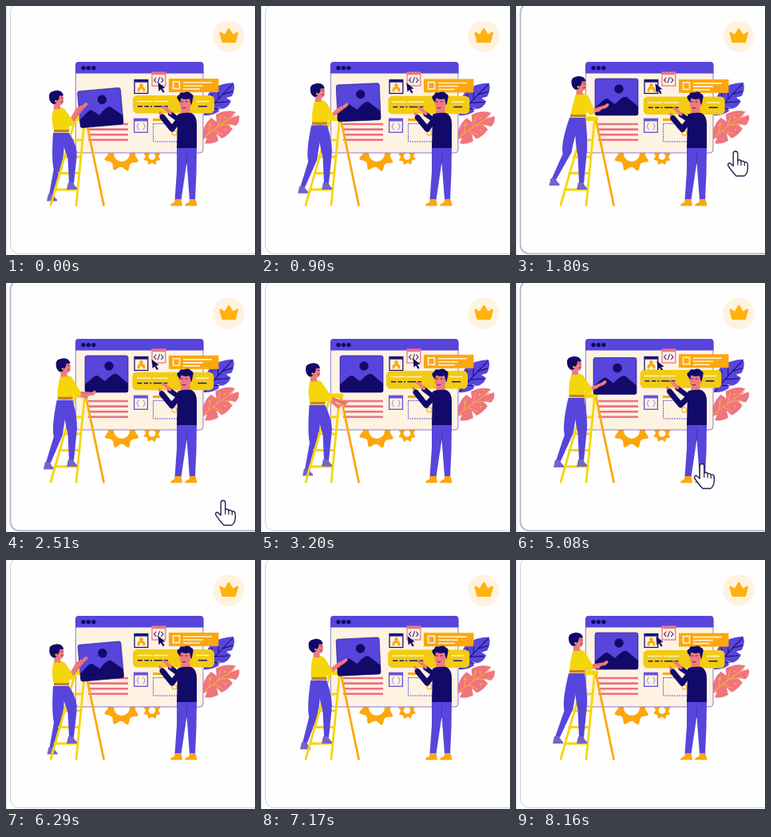
These frames come from a looping animation (312x312 px, 8.23 s). An HTML page:

```html
<!DOCTYPE html>
<html lang="en">
<head>
<meta charset="utf-8">
<title>Building a web page</title>
<style>
html, body { margin: 0; width: 100%; height: 100%; overflow: hidden; background: #fdfdfe; }
svg { display: block; width: 100vw; height: 100vh; }
.line { fill: none; stroke-linecap: round; stroke-linejoin: round; }
.purple { fill: #5745dc; } .navy { fill: #120a69; } .yellow { fill: #f4d60b; }
.orange { fill: #fca70c; } .skin { fill: #ee7b80; } .cream { fill: #fef2e2; }
</style>
</head>
<body>
<svg viewBox="0 0 312 312">
  <path d="M.7 0V312" stroke="#e2e2ea"/>
  <rect id="card" x="5.5" y="-3" width="330" height="313.4" rx="11" fill="#fefefe" stroke="#c9c8d8"/>
  <circle cx="279" cy="38" r="19.7" fill="#fff2df"/>
  <path fill="#ffb20d" d="M267.5 33.5Q267.5 32 269 32.5L274 35.5L278 28.5Q279.2 27 280.4 28.5L284.5 35.5L289.5 32.5Q291.4 32 291 34L288.3 44.5Q288 46 286.5 46H272Q270.5 46 270.2 44.5Z"/>

  <g id="leafA">
    <path class="purple" d="M248 137Q248 116 257 105Q267 97 285 96Q288 104 283 113L276 115L282 119Q279 127 271 129L265 127L267 132Q258 138 248 137Z"/>
    <path class="line" stroke="#120a69" d="M249 136Q262 120 284 98M258 126V110M266 117V104M262 121L279 120M271 111L284 107M256 128L268 129"/>
  </g>
  <g id="leafB">
    <path d="M244 168Q247 148 257 140L264 145L263 136Q276 129 288 133L280 141L292 137Q294 144 288 150L278 148L284 154Q278 163 270 166L264 160L266 169Q257 174 249 172L252 165Z" fill="#f0757e"/>
    <path class="line" stroke="#f3b13a" d="M244 168Q262 153 286 137M254 160L257 146M265 152L269 138M260 156L271 161M269 149L284 148"/>
    <g fill="#f4c63a"><circle cx="255" cy="149" r="1"/><circle cx="274" cy="140" r="1"/><circle cx="275" cy="155" r="1"/></g>
  </g>
  <g id="gears" class="orange" fill-rule="evenodd"></g>

  <rect x="87.3" y="70.5" width="159.7" height="113.5" rx="4" class="cream" stroke="#8c78d8"/>
  <path class="purple" d="M87 84.5V74Q87 70 91 70H243.5Q247.5 70 247.5 74V84.5Z"/>
  <g class="navy"><circle cx="97" cy="77.6" r="2.7"/><circle cx="103.4" cy="77.6" r="2.7"/><circle cx="109.8" cy="77.6" r="2.7"/></g>
  <path d="M103 148H153M103 154.6H153M103 161.2H153M103 167.8H153" stroke="#ed7080" stroke-width="2.6"/>

  <g id="icons"></g>
  <path class="line" stroke="#fca70c" stroke-width="3" d="M166 106Q166 102.5 169.5 102.5Q173 102.5 173 106"/>
  <circle cx="169.5" cy="99.2" r="2.2" class="orange"/>
  <path class="line" stroke="#3c237e" stroke-width="1.1" d="M188 90L185.5 92.8L188 95.6M194.5 90L197 92.8L194.5 95.6M192.4 89.4L190.2 96.2"/>
  <path class="line" stroke="#a18ad0" stroke-width="1" d="M166.5 147Q164.8 147 165 149Q165.1 150.7 163.8 150.8Q165.1 151 165 152.7Q164.8 154.6 166.5 154.6M171.8 147Q173.5 147 173.3 149Q173.2 150.7 174.5 150.8Q173.2 151 173.3 152.7Q173.5 154.6 171.8 154.6"/>
  <path d="M184 142.5H197" stroke="#fca70c" stroke-width="3"/>
  <rect x="184.5" y="147.5" width="34" height="22.5" fill="none" stroke="#6b58d8" stroke-width="1" stroke-dasharray="2 1"/>
  <circle cx="211" cy="159" r="3" fill="none" stroke="#f8bd4f" stroke-width="1.5"/>

  <g id="tag">
    <rect x="204" y="91" width="62.5" height="17" class="orange"/>
    <rect x="209.5" y="95" width="8" height="8.5" fill="none" stroke="#fef2e2" stroke-width="1.6"/>
    <path d="M222 96H258M222 100H247M222 104H243" stroke="#fef2e2" stroke-width="1.6"/>
  </g>
  <g id="arrow"><path class="navy" d="M0 0L9 7.2L5.4 7.7L8.2 12L6.2 13.2L3.5 8.8L1 11.5Z"/></g>

  <path class="line" stroke="#fca70c" stroke-width="2.8" d="M100 142L122.5 249.5"/>
  <g id="legBack"></g>
  <path class="line" stroke="#f4d60b" stroke-width="2.8" d="M79 168H96M72.500 189H94M66.500 209.500H92M61 230H90M87 141L56 249.500M98.500 142L88 249.500"/>
  <rect x="86" y="138.500" width="17" height="5.500" rx="1" class="yellow"/>

  <g id="picture">
    <rect x="-27" y="-23" width="54" height="46" rx="2.5" class="purple" stroke="#281b90" stroke-width=".7"/>
    <circle cx="3" cy="-10" r="5.700" class="navy"/>
    <path class="navy" d="M-27 13C-20 8-14-1-10 3L-2 9C4 3 10-3 14 1L27 12V20.500Q27 23 24.500 23H-24.500Q-27 23-27 20.500Z"/>
  </g>
  <g id="woman"></g>

  <g id="bar">
    <rect width="102" height="22.500" rx="5.500" fill="#f2cb12"/>
    <path class="line" stroke="#fff2bd" stroke-width="1.600" d="M6 7.500H23M26 7.500H44M80 7.500H95"/>
    <path stroke="#251879" stroke-width="1.600" d="M6 13.800H12M14.500 13.800H20M22 13.800H24M26.500 13.800H37M39 13.800H44M82 13.800H93"/>
  </g>
  <g id="man">
    <path class="purple" d="M214 176H239L238.500 210L237 243H230L226.500 196L219.500 243H211.500L214 207Z"/>
    <path class="line" stroke="#4032b8" stroke-width=".8" d="M226.500 184V197"/>
    <path class="orange" d="M211.500 242H219.500L221 250.500H206Q206 247.500 211 246ZM230 242H237.500L239.500 250.500H224Q224 247.500 229.500 246Z"/>
    <path class="skin" d="M220 125H230L231 137H219Z"/>
    <path class="navy" d="M215 136Q221 133 232 134Q239 137 239 148V178H214Z"/>
    <path class="skin" d="M217.500 115Q217 131 223 132Q231 132 232.500 120L232 113H219Z"/>
    <path class="navy" d="M216 118Q212 113 217.500 111Q217 107.500 223 108.500Q229 106 232 110Q236 111 234 117L232.500 124Q231 122 230 116Q224 118 219.500 115.500L218 121Z"/>
    <path class="line" stroke="#35145c" stroke-width=".9" d="M219.500 120H221.500M225 120H227M221 127.500Q223 129 225 127.500"/>
  </g>
  <g id="manArms"></g>

  <g id="pointer">
    <path class="line" style="fill:#fff" stroke="#25204f" stroke-width="1.400" d="M-2.800 3Q-2.800 0 0 0Q2.800 0 2.800 3V12Q4.500 9.500 7 12V13Q9.500 10.800 11.300 14Q15 12.500 15.300 17V22Q15 28 11 31H1Q-3 27-5 24L-9 18.500Q-10.500 15-7 14.800L-2.800 18.500Z"/>
    <path class="line" stroke="#25204f" stroke-width="1.200" d="M2.800 12V17M7 13V17.500M11.300 14V18"/>
  </g>
</svg>
<script>
const LOOP = 8230;
const el = id => document.getElementById(id);

const poses = [
  {t: 0, head: [63, 115], hip: [69, 157], foot: [57, 240.5], elbow: [80, 146], hand: [98, 125], pic: [118.3, 127.5, -5], bar: [159, 112], arrow: [190.5, 95.5]},
  {t: 1800, head: [78.5, 97], hip: [77, 138], foot: [47.5, 221], elbow: [94, 132], hand: [112, 126], pic: [126, 114, 0], bar: [159.7, 113.5], arrow: [174.5, 97]},
  {t: 3200, head: [65, 109.5], hip: [70.5, 151], foot: [58, 237.5], elbow: [85, 145], hand: [105, 151], pic: [126, 114, 0], bar: [157, 110], arrow: [190.5, 94.5]},
  {t: 4100, head: [73, 98], hip: [76, 139], foot: [63, 223], elbow: [92, 123], hand: [106, 107], pic: [128, 112.5, 0], bar: [159, 112.5], arrow: [188.5, 91]},
  {t: 5080, head: [73, 101], hip: [75.5, 142], foot: [53, 227], elbow: [91, 134], hand: [109, 126], pic: [124, 116.5, 0], bar: [155.5, 109], arrow: [176.5, 97.5]},
  {t: 6290, head: [63.3, 114.5], hip: [69, 156], foot: [57.5, 239.5], elbow: [80, 146], hand: [98, 125], pic: [118.8, 127, -5], bar: [159, 112], arrow: [190.5, 95]},
  {t: 8160, head: [75, 100], hip: [76, 140], foot: [52, 226], elbow: [92, 134], hand: [111, 130], pic: [126, 114, 0], bar: [159.5, 113], arrow: [175.5, 95.5]}
];
const pointerPath = [
  {t: 1100, p: [279, 314]}, {t: 1700, p: [275, 182]}, {t: 1900, p: [275, 182]}, {t: 2500, p: [272, 272]}, {t: 2680, p: [272, 314]},
  {t: 3460, p: [276, 314]}, {t: 4000, p: [262, 164.5]}, {t: 4300, p: [262, 164.5]}, {t: 4900, p: [233, 226.5]}, {t: 5180, p: [233, 226.5]}, {t: 5780, p: [236, 314]}
];

const clamp = v => Math.min(1, Math.max(0, v));
const ease = k => k * k * (3 - 2 * k);
const mix = (a, b, k) => a.map((v, i) => v + (b[i] - v) * k);
const add = (p, x, y) => [p[0] + x, p[1] + y];
const move = (id, x, y, a = 0) => el(id).setAttribute('transform', `translate(${x} ${y}) rotate(${a})`);

function sample(keys, name, t) {
  const n = Math.max(1, keys.findIndex(k => k.t > t));
  const i = keys[keys.length - 1].t <= t ? keys.length - 1 : n;
  const a = keys[i - 1], b = keys[i];
  return mix(a[name], b[name], ease(clamp((t - a.t) / (b.t - a.t))));
}

const line = (points, color, width) =>
  `<polyline class="line" points="${points.map(p => p.join()).join(' ')}" stroke="${color}" stroke-width="${width}"/>`;
const leg = (hip, knee, foot) =>
  `<path class="purple" d="M${add(hip, -7, 0)}Q${add(knee, -8, -8)} ${add(knee, -5, 4)}L${add(foot, -3, -4)}L${add(foot, 3, -4)}L${add(knee, 6, 2)}Q${add(knee, 8, -12)} ${add(hip, 7, 0)}Z"/>`;
const shoe = p =>
  `<path d="M${add(p, -4, -5)}L${add(p, 2, -5)}Q${add(p, 4, 0)} ${add(p, 7, 2)}V${p[1] + 4}H${p[0] - 6}Z" fill="#7563c8"/>`;

function gear(cx, cy, r, hole, teeth, turn) {
  const pts = [];
  for (let i = 0; i < teeth * 4; i++) {
    const a = (i + (i % 4 === 1 ? .25 : i % 4 === 2 ? -.25 : 0)) * Math.PI / teeth / 2 + turn;
    const d = i % 4 === 1 || i % 4 === 2 ? r : r * .76;
    pts.push([cx + d * Math.cos(a), cy + d * Math.sin(a)]);
  }
  return `<path d="M${pts.join('L')}Z M${cx - hole} ${cy}a${hole} ${hole} 0 1 0 ${2 * hole} 0a${hole} ${hole} 0 1 0 ${-2 * hole} 0"/>`;
}

const icon = (x, y, color) =>
  `<rect x="${x}" y="${y}" width="16.8" height="17" class="cream" stroke="${color}" stroke-width="1.3"/><path d="M${x} ${y + 1.6}h16.8" stroke="${color}" stroke-width="3.2"/>`;
el('icons').innerHTML = icon(161, 92.5, '#1d1476') + icon(183, 83, '#ed7582') + icon(160.6, 141.3, '#6553d9');

function drawWoman(p) {
  const {head, hip, hand, elbow, foot} = p;
  const neck = add(head, 2.5, 12), shoulder = add(head, 9, 20);
  const drop = (hip[1] - 138) / 19;
  const backKnee = add(mix(hip, foot, .52), 2, 0);
  const frontFoot = [82, 226];
  const frontKnee = [82.5, 184 + 4 * drop];
  el('legBack').innerHTML = leg(add(hip, -3, 2), backKnee, foot) + shoe(foot);

  const otherHand = add(hand, -8, 4);
  const torso = `<path class="yellow" d="M${add(neck, -6, 1)}Q${add(neck, 3, -2)} ${add(neck, 9, 3)}L${add(hip, 11, -1)}H${hip[0] - 9}Q${add(neck, -10, 14)} ${add(neck, -6, 1)}Z"/>`;
  const belt = `<rect x="${hip[0] - 9}" y="${hip[1] - 2}" width="19" height="3.4" fill="#c48424"/>`;
  const face = `<g transform="translate(${head})">
    <path class="skin" d="M-3 3L-3 14H5L5 9Q10 9 9-1L6-6H-2Z"/>
    <path class="navy" d="M-9-1Q-10-8-1-9Q7-10 9-3Q6-2 4-3Q4 2 1 4Q0 8-4 8Q-9 5-9-1Z"/>
    <circle cx="-.5" cy="4.2" r="1.2" class="yellow"/>
    <path class="line" stroke="#3a165b" stroke-width=".8" d="M6.200 0H7.500M6 5.500Q7 6 8 5"/></g>`;
  el('woman').innerHTML =
    leg(add(hip, 3, 2), frontKnee, frontFoot) + shoe(frontFoot) +
    line([add(shoulder, -1, 0), add(elbow, 2, -1), hand], '#e56f78', 4) +
    torso + belt + face +
    line([elbow, otherHand], '#ee7b80', 4.4) +
    line([otherHand, add(otherHand, 4, -3)], '#ee7b80', 2.4) +
    line([hand, add(hand, 2.5, -2)], '#ee7b80', 4) +
    line([shoulder, elbow], '#f4d60b', 9);
}

function drawManArms(bar) {
  const dx = bar[0] - 159, dy = bar[1] - 112;
  const wrist = [196 + dx, 139 + dy], elbow = [208 + dx * .5, 154 + dy * .4], grip = [200 + dx, 128 + dy];
  el('manArms').innerHTML =
    line([[217, 143], add(grip, 6, 7)], '#120a69', 6) +
    line([add(grip, 6, 6), grip], '#ee7b80', 4) +
    line([grip, add(grip, -3, -1)], '#ee7b80', 2.5) +
    line([wrist, add(wrist, -3, -5)], '#ee7b80', 3.6) +
    line([[218, 141], elbow, wrist], '#120a69', 7);
}

function draw(t) {
  const pose = {};
  for (const name of ['head', 'hip', 'foot', 'elbow', 'hand', 'pic', 'bar', 'arrow']) pose[name] = sample(poses, name, t);
  drawWoman(pose);
  drawManArms(pose.bar);
  move('picture', ...pose.pic);
  move('bar', ...pose.bar);
  move('arrow', ...pose.arrow);
  move('tag', 0, (pose.bar[1] - 112) * .6);

  const sway = Math.sin(t / 3145 * 2 * Math.PI);
  el('leafA').setAttribute('transform', `rotate(${sway * .9} 248 137)`);
  el('leafB').setAttribute('transform', `rotate(${sway * 1.2} 244 168)`);
  el('gears').innerHTML = gear(145, 185, 22.5, 10, 8, .15 + sway * .05) + gear(183, 188.5, 11, 4.3, 8, .1 - sway * .08);

  const shown = t > 1100 && t < 2680 || t > 3460 && t < 5780;
  el('pointer').style.display = shown ? '' : 'none';
  move('pointer', ...sample(pointerPath, 'p', t));
  const fade = (from, to) => clamp((t - from) / 150) * clamp((to - t) / 150);
  const hover = Math.max(fade(1120, 2850), fade(3480, 6000));
  el('card').setAttribute('stroke-width', 1 + .7 * hover);
  el('card').setAttribute('stroke', `rgb(${mix([208, 207, 220], [182, 180, 200], hover).map(Math.round)})`);
}

const start = performance.now();
function tick() {
  draw((performance.now() - start) % LOOP);
  requestAnimationFrame(tick);
}
tick();
</script>
</body>
</html>
```
